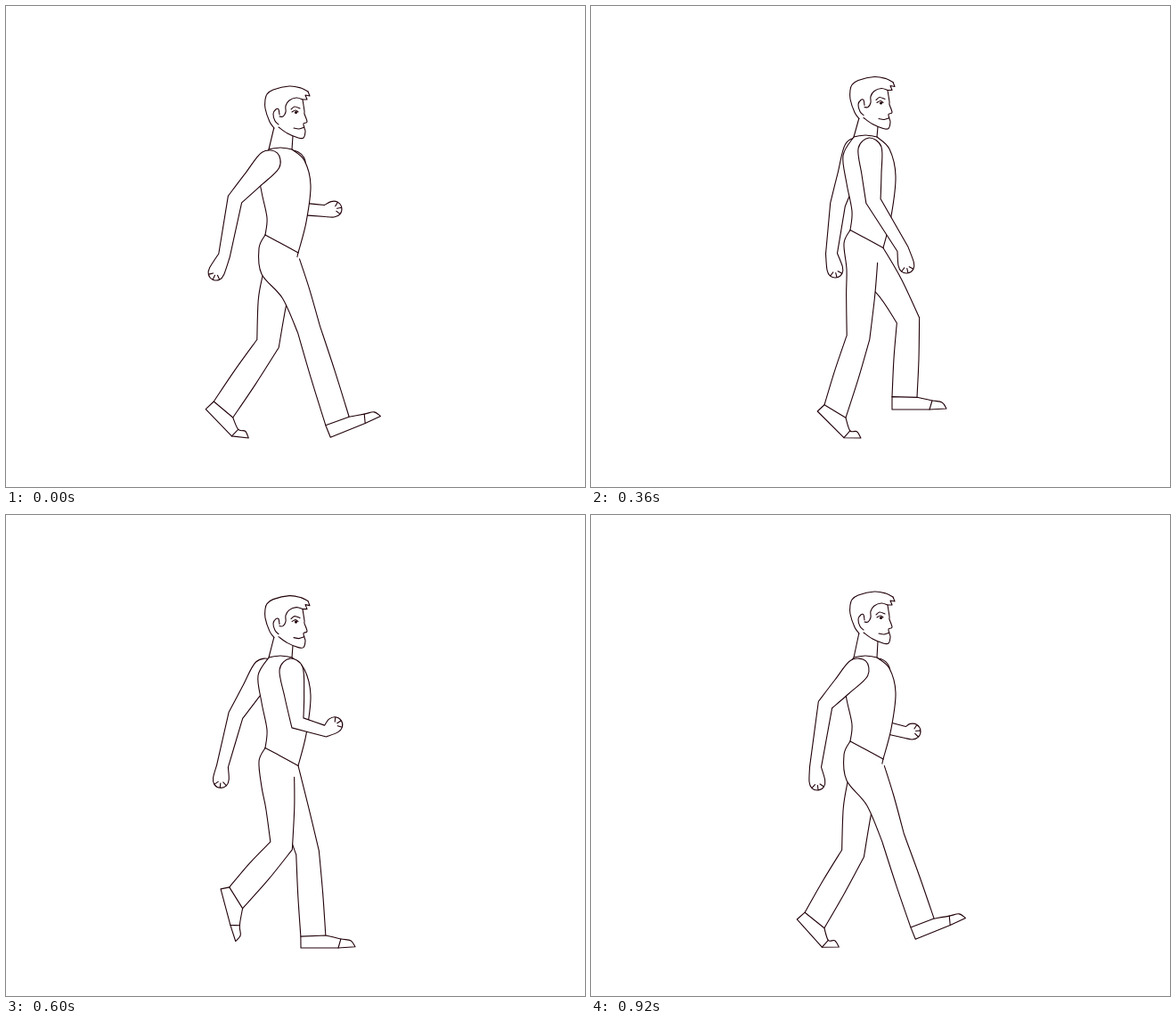
These frames come from a looping animation (650x540 px, 0.96 s). An HTML page with a canvas:

```html
<!DOCTYPE html>
<html lang="en">
<head>
<meta charset="utf-8">
<title>Walk cycle</title>
<style>
html, body { margin: 0; width: 100%; height: 100%; overflow: hidden; background: #fff; }
canvas { display: block; }
</style>
</head>
<body>
<canvas id="stage" width="650" height="540"></canvas>
<script>
const ctx = document.getElementById("stage").getContext("2d");
const LOOP = 960, STEP = 40, FLOOR = 486;

// Bob, once per step: time, nose y, neck y, waist y
const bob = [
  [0, 130, 161, 257], [40, 131, 163, 260], [200, 129, 156, 261],
  [360, 119.5, 147, 251.5], [440, 126, 160, 254]
];
// One stride, shared by both legs: time, knee, ankle, foot angle
const stride = [
  [0, 340,363, 372,466, -22], [40, 349,382, 363,470, 0], [200, 325,373, 325,472, 0],
  [360, 300,372, 274,455, 45], [440, 294,380, 251,455, 48], [480, 294,379, 244,453, 46],
  [520, 300,372, 246,440, 68], [680, 320,370, 277,425, 69], [840, 356,353, 352,439, 0],
  [920, 339,362, 372,458, -22]
];
// Arm swing: time, shoulder x, elbow, wrist, hand
const nearSwing = [
  [0, 297, 257,217, 245,280, 236,299], [200, 298, 275,217, 262,285, 251,303],
  [360, 313, 317,219, 350,273, 354,291], [520, 326, 338,236, 357,230, 364,225],
  [680, 311, 310,227, 350,262, 363,259], [840, 300, 276,214, 276,274, 288,294],
  [920, 301, 263,213, 252,283, 254,300]
];
const farSwing = [
  [0, 322, 333,228, 358,230, 368,228], [200, 318, 320,243, 341,260, 348,262],
  [360, 298, 277,223, 270,278, 274,296], [520, 292, 258,226, 247,282, 248,297],
  [680, 294, 266,226, 252,280, 249,295], [840, 311, 313,245, 333,269, 339,274],
  [920, 322, 328,238, 353,244, 361,243]
];

// Cyclic Hermite interpolation; "loose" lets a part swing past its keys
function sample(track, time, period = LOOP, loose = false) {
  const n = track.length, t = time % period;
  const at = i => {
    const turn = Math.floor(i / n), [start, ...values] = track[i - turn * n];
    return { time: start + turn * period, values };
  };
  let i = n - 1;
  while (track[i][0] > t) i--;
  const [a, b, c, d] = [at(i - 1), at(i), at(i + 1), at(i + 2)];
  const span = c.time - b.time, u = (t - b.time) / span;
  const slope = (p, q, r, j) => {
    const h1 = q.time - p.time, h2 = r.time - q.time;
    const d1 = q.values[j] - p.values[j], d2 = r.values[j] - q.values[j];
    return (loose ? d1 * h2 / h1 + d2 * h1 / h2 : d1 + d2) / (h1 + h2);
  };
  return b.values.map((v, j) => {
    const w = c.values[j], m = slope(a, b, c, j) * span, k = slope(b, c, d, j) * span;
    return v + u * (m + u * (3 * (w - v) - 2 * m - k + u * (2 * (v - w) + m + k)));
  });
}

const mix = (a, b, u) => a.map((v, i) => v + (b[i] - v) * u);
const unit = ([x, y]) => [x / Math.hypot(x, y), y / Math.hypot(x, y)];
const dir = (a, b) => unit([b[0] - a[0], b[1] - a[1]]);
const bisect = (a, b) => unit([a[0] + b[0], a[1] + b[1]]);
// Point x along direction d and y across it
const offset = (p, d, x, y) => [p[0] + d[0] * x - d[1] * y, p[1] + d[1] * x + d[0] * y];
const points = (...flat) => Array.from({ length: flat.length / 2 }, (_, i) => flat.slice(2 * i, 2 * i + 2));

function curve(p, join) {
  if (join) ctx.lineTo(...p[0]); else ctx.moveTo(...p[0]);
  for (let i = 0; i < p.length - 1; i++) {
    const a = p[i - 1] || p[i], b = p[i], c = p[i + 1], d = p[i + 2] || c;
    ctx.bezierCurveTo(b[0] + (c[0] - a[0]) / 6, b[1] + (c[1] - a[1]) / 6,
      c[0] - (d[0] - b[0]) / 6, c[1] - (d[1] - b[1]) / 6, ...c);
  }
}
function lines(...paths) {
  ctx.beginPath();
  paths.forEach(p => curve(p));
  ctx.stroke();
}
function fill(...paths) {
  ctx.beginPath();
  paths.forEach((p, i) => curve(p, i > 0));
  ctx.fill();
}

function drawLeg(t, waist, near) {
  const [kx, ky, ax, ay, degrees] = sample(stride, t);
  const hip = [306, waist + 12], knee = [kx, ky], ankle = [ax, ay];
  const angle = degrees * Math.PI / 180, foot = [Math.cos(angle), Math.sin(angle)];
  const thigh = dir(hip, knee), shin = dir(knee, ankle), bend = bisect(thigh, shin);
  const cuff = bisect(shin, [-foot[1], foot[0]]);
  const middle = mix(hip, knee, 0.57), calf = mix(knee, ankle, 0.5);

  const side = (top, s) => {
    const joint = offset(knee, bend, 0, 13 * s);
    return [[...top, offset(middle, thigh, 0, 16 * s), joint],
      [joint, offset(calf, shin, 0, 14 * s), offset(ankle, cuff, 0, 14 * s)]];
  };
  const back = side(near ? points(291, waist, 284, waist + 15, 287, waist + 44) : [[288, waist + 46]], 1);
  const front = side([near ? offset(mix(hip, knee, 0.22), thigh, 0, -17) : [328, waist + 20]], -1);
  fill(...back, [...front[1]].reverse(), [...front[0]].reverse());
  lines(...back, ...front);
  drawShoe(ankle, foot, angle, front[1][2], back[1][2]);
}

// The toe bends just enough to stay on the floor
function drawShoe(ankle, foot, angle, cuffFront, cuffBack) {
  const ground = ([x, y]) => [x, Math.min(y, FLOOR)];
  const heel = ground(offset(ankle, foot, -14, 14)), ball = ground(offset(ankle, foot, 28, 14));
  const bend = Math.min(angle, Math.asin(Math.min(1, (FLOOR - ball[1]) / 19)));
  const toe = [Math.cos(bend), Math.sin(bend)];
  const instep = offset(ball, bisect(foot, toe), 3, -10);
  ctx.beginPath();
  curve([cuffFront, instep, offset(ball, toe, 14, -8), offset(ball, toe, 19, -1)]);
  for (const p of [ball, heel, cuffBack]) ctx.lineTo(...p);
  ctx.closePath();
  ctx.fill();
  ctx.stroke();
  lines([instep, ball]);
}

function drawArm(swing, t, neck) {
  const [sx, ex, ey, wx, wy, hx, hy] = sample(swing, t, LOOP, true);
  const shoulder = [sx, neck + 12], elbow = [ex, ey], wrist = [wx, wy], hand = [hx, hy];
  const upper = dir(shoulder, elbow), fore = dir(elbow, wrist), palm = dir(wrist, hand);
  const bend = bisect(upper, fore), turn = bisect(fore, palm);
  const side = s => [
    offset(wrist, turn, 0, 6.5 * s), offset(elbow, bend, 0, 8.5 * s),
    offset(mix(shoulder, elbow, 0.5), upper, 0, 11 * s), offset(shoulder, upper, 0, 13 * s)
  ];
  const back = side(1), front = side(-1);
  const sleeve = [...back.slice(1), offset(shoulder, upper, -11, 0), ...front.slice(1).reverse()];
  const rim = [2, 1, 0, -1, -2].map(i => offset(hand, palm, 9 * Math.cos(i * 0.87), 9 * Math.sin(i * 0.87)));
  const fist = [back[0], ...rim, front[0]];
  const parts = [back.slice(0, 2), sleeve, [front[1], front[0]]];
  fill(...parts);
  fill(fist);
  lines(...parts, fist, ...rim.slice(1, 4).map(p => [p, mix(p, hand, 0.6)]));
}

function drawTorso(neck, waist) {
  const place = ([x, u]) => [x, neck + (waist - neck) * u];
  const back = points(295, 0, 283, 0.2, 287, 0.5, 293, 0.8, 291, 1).map(place);
  const front = [[328, waist + 20], ...points(337, 0.85, 342, 0.42, 335, 0.13, 321, 0).map(place)];
  const collar = points(321, neck, 308, neck - 2, 295, neck);
  fill(back, front, collar);
  lines(back, front, collar);
}

// Head shapes are measured from the tip of the nose
const hair = points(-37,7, -42,0, -47,-15, -47,-25, -45,-31, -38,-36, -20,-40, -7,-38, 1,-34);
const tips = points(1,-34, 3,-29, -2,-30, 0,-25, -5,-25);
const face = points(-5,-25, -3,-12, -3,-9, 0,0, -4,2, -3,7, -2,11, -4,18, -10,18, -22,13, -32,6);
const hairline = points(-5,-25, -12,-27, -20,-24, -24,-18, -24,-11, -27,-6, -31,-6);
const ear = points(-31,-8, -32,-14, -35,-14, -38,-9, -36,-1, -32,3);
const brow = points(-18,-14, -14,-17, -8,-15);
const eye = points(-17,-11, -13,-13, -10,-11);
const mouth = points(-15,7, -9,8, -3,6);

function drawHead(y, neck) {
  lines(points(301, y + 6, 295, neck), points(322, y + 16, 321, neck));
  ctx.save();
  ctx.translate(338, y);
  fill(hair, tips, face);
  lines(hair, face, hairline, ear, brow, eye, mouth);
  ctx.beginPath();
  tips.forEach(p => ctx.lineTo(...p));
  ctx.stroke();
  ctx.fillStyle = ctx.strokeStyle;
  ctx.beginPath();
  ctx.arc(-12.5, -10.5, 1.6, 0, 7);
  ctx.fill();
  ctx.restore();
}

function draw(t) {
  ctx.fillStyle = "#fff";
  ctx.fillRect(0, 0, 650, 540);
  ctx.strokeStyle = "#200008";
  ctx.lineWidth = 1.1;
  ctx.lineJoin = ctx.lineCap = "round";
  const [nose, neck, waist] = sample(bob, t, LOOP / 2);
  drawArm(farSwing, t, neck);
  drawLeg(t + LOOP / 2, waist, false);
  drawTorso(neck, waist);
  drawLeg(t, waist, true);
  lines(points(291, waist, 306, waist + 8, 328, waist + 20));
  drawArm(nearSwing, t, neck);
  drawHead(nose, neck);
}

function tick() {
  draw(Math.floor(performance.now() % LOOP / STEP) * STEP);
  requestAnimationFrame(tick);
}
tick();
</script>
</body>
</html>
```
